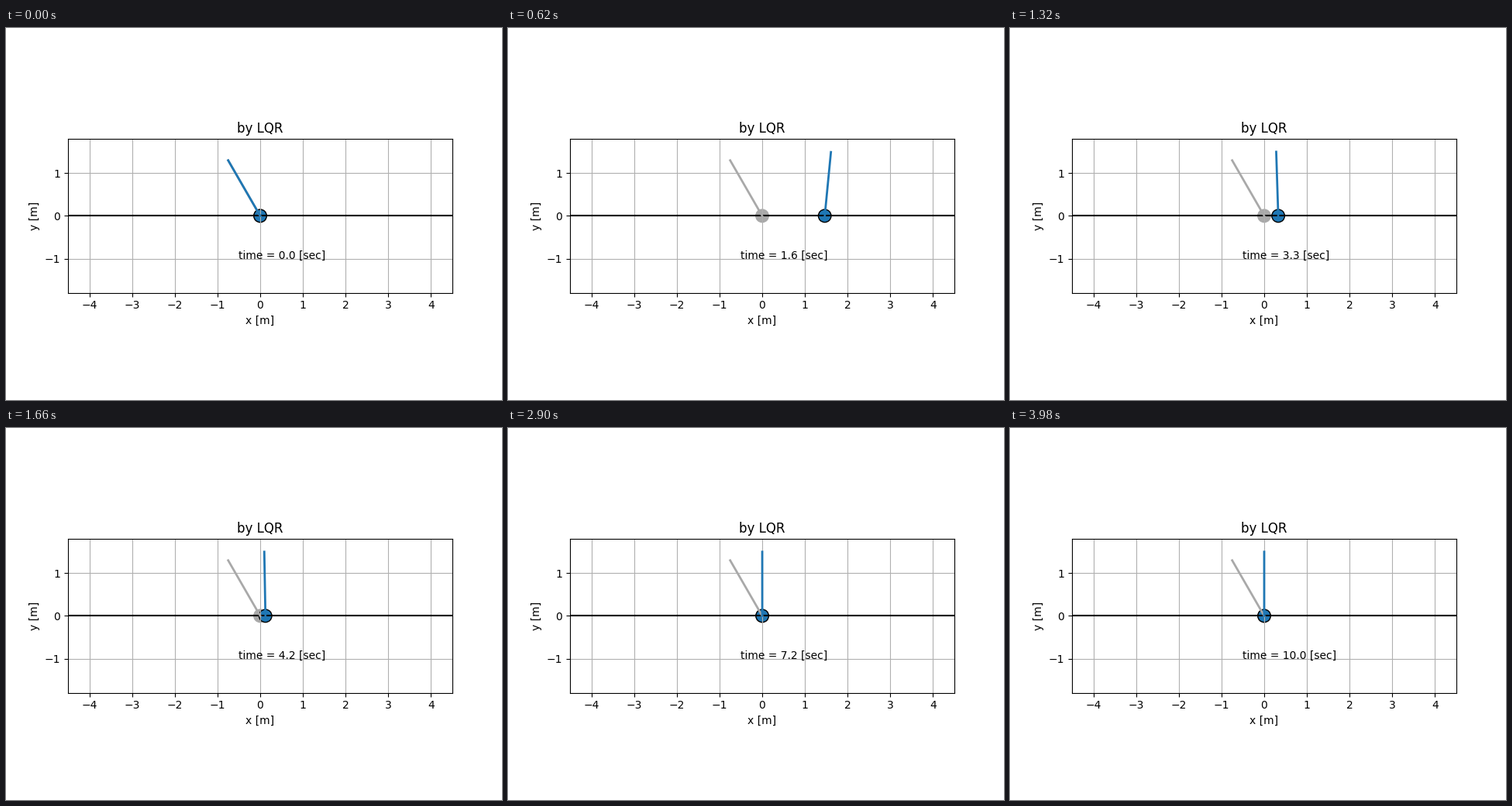
A matplotlib script that plays this animation: 640 px wide and 480 px high, repeating every 4000 ms.

```python
import numpy as np
import matplotlib.pyplot as plt
from matplotlib.animation import FuncAnimation
from matplotlib.patches import Circle

FRAMES, INTERVAL = 200, 20   # ms between frames
DT = 0.05                    # simulated seconds per frame
G = 9.8
ROD = 1.5
L_EFF = 2 / 3 * ROD          # equivalent point-mass length of a uniform rod
THETA0 = np.pi / 6

# Closed-loop response of z = x + L_EFF * theta, for which z'' = G * theta
poles = np.roots([1, 9.295, 29.59, 39.77, 19.49])
start = [L_EFF * THETA0, 0, G * THETA0, 0]
amps = np.linalg.solve(np.vander(poles, increasing=True).T, start)


def state(t):
    """Cart position and rod angle at time t."""
    modes = amps * np.exp(poles * t)
    theta = (modes * poles**2).sum().real / G
    return modes.sum().real - L_EFF * theta, theta


def rod_points(x, theta):
    return [x, x - ROD * np.sin(theta)], [0, ROD * np.cos(theta)]


def add_pendulum(ax, x, theta, color, edge):
    disc = ax.add_patch(Circle((x, 0), 0.15, facecolor=color, edgecolor=edge))
    rod, = ax.plot(*rod_points(x, theta), color=color, lw=2)
    return disc, rod


plt.rcParams["font.family"] = "DejaVu Sans"
fig, ax = plt.subplots(figsize=(6.4, 4.8), dpi=100)
ax.set_aspect("equal")
ax.set_xlim(-4.5, 4.5)
ax.set_ylim(-1.8, 1.8)
ax.set_xticks(range(-4, 5))
ax.set_yticks([-1, 0, 1])
ax.set_xlabel("x [m]")
ax.set_ylabel("y [m]")
ax.set_title("by LQR")
ax.grid(True)

ax.axhline(0, color="black", lw=1.5)
add_pendulum(ax, 0, THETA0, "darkgray", "darkgray")
disc, rod = add_pendulum(ax, 0, THETA0, "tab:blue", "black")
clock = ax.text(-0.5, -1, "")


def update(i):
    t = i * DT
    x, theta = state(t)
    disc.center = x, 0
    rod.set_data(*rod_points(x, theta))
    clock.set_text(f"time = {t:.1f} [sec]")
    return disc, rod, clock


anim = FuncAnimation(fig, update, frames=FRAMES, interval=INTERVAL,
                     repeat=True, repeat_delay=0)
plt.show()
```
